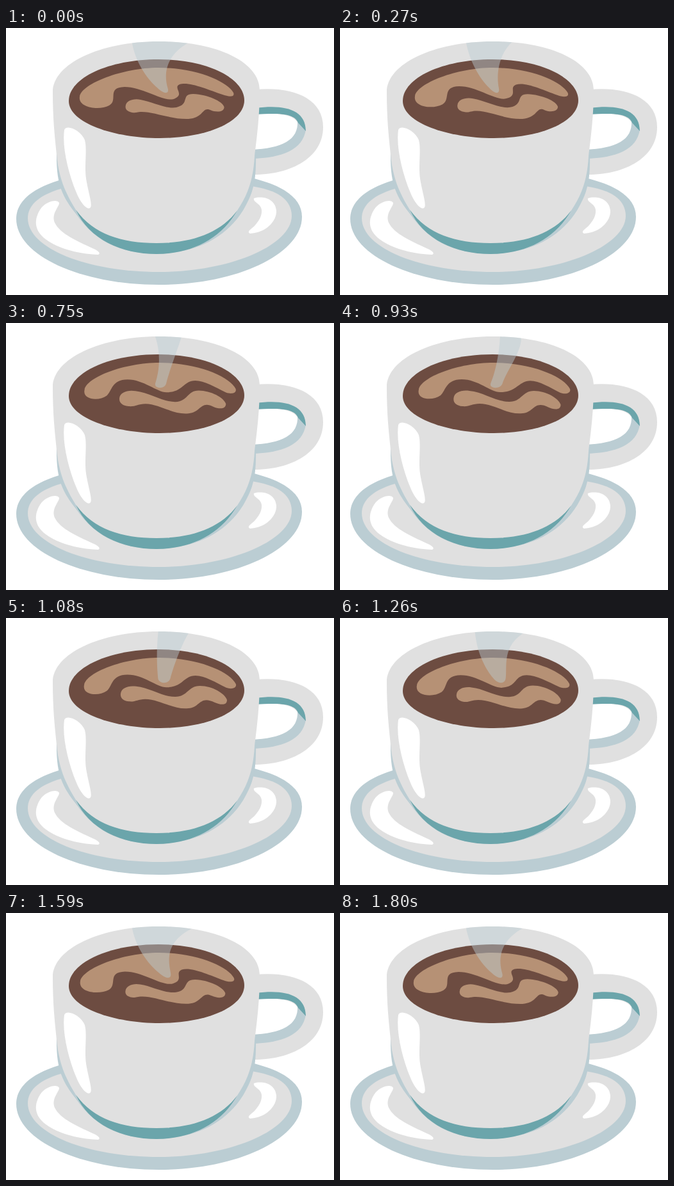
Write an HTML page that moves like this. It is 512 px wide and 417 px high and loops after 1830 ms.

```html
<!DOCTYPE html>
<html lang="en">
<head>
<meta charset="utf-8">
<title>Coffee cup</title>
<style>
  html, body { margin: 0; width: 100%; height: 100%; overflow: hidden; background: #fff; }
  svg { display: block; width: 100%; height: 100%; }
  .light { fill: #e0e0e0; }
  .blue { fill: #bbcdd3; }
  .teal { fill: #6ba5ab; }
  .white { fill: #fff; }
  .coffee { fill: #6d4c41; }
  .crema { fill: #b69175; }
</style>
</head>
<body>
<svg viewBox="0 0 512 417">
  <defs>
    <path id="cup" d="M73 100C73 56 147 21 238 21S396 53 396 97C396 140 391 175 388 200C386 240 376 262 361 285C336 329 290 353 235 353S130 330 109 284C94 260 82 235 79 197C76 170 73 140 73 100Z"/>
    <clipPath id="inCup"><use href="#cup"/></clipPath>
  </defs>

  <!-- saucer -->
  <path class="blue" d="M16 298C16 355 116 401 239 401S462 352 462 295C462 260 420 238 350 228H130C60 238 16 262 16 298Z"/>
  <path class="light" d="M34 297C34 344 126 381 239 381C348 381 445 340 446 294C446 268 424 253 383 247L86 251C55 260 34 275 34 297Z"/>
  <path class="white" d="M83 273C80 267 62 270 53 284C42 302 46 318 62 330C82 345 115 353 144 354C149 352 143 347 135 344C110 332 85 322 76 304C70 290 84 278 83 273Z"/>
  <path class="white" d="M387 266C400 262 420 266 422 285C423 302 405 320 381 321C375 318 383 314 388 309C395 301 400 293 399 284C398 274 385 272 387 266Z"/>

  <!-- handle -->
  <path class="light" d="M390 96C445 91 495 108 495 155C495 202 445 230 383 229Z"/>
  <path class="white" d="M390 135C440 130 457 141 457 155C457 175 430 190 385 190Z"/>
  <path class="blue" d="M455 145L468 159C463 190 432 203 383 204V190C431 188 457 175 455 145Z"/>
  <path class="teal" d="M390 125C436 119 468 128 468 161L456 148C450 133 425 133 390 135Z"/>

  <!-- cup -->
  <path class="blue" d="M79 190C78 240 85 260 109 290C140 335 180 352 235 352C300 352 345 325 370 285C387 255 391 240 390 190Z"/>
  <use class="light" href="#cup"/>
  <path class="teal" d="M109 284C130 330 180 353 235 353S336 329 361 285C335 320 290 336 235 336S137 322 109 284Z"/>
  <path class="white" d="M91 159C95 150 117 160 123 175C127 190 122 215 125 235C128 255 135 275 132 280C128 286 118 275 112 262C99 233 87 188 91 159Z"/>

  <!-- drink -->
  <path class="coffee" d="M98 114C98 78 160 49 238 49S372 79 372 113S312 172 240 172S98 148 98 114Z"/>
  <path class="crema" id="upper"/>
  <path class="crema" id="lower"/>
  <path class="blue" id="steam" opacity=".45" clip-path="url(#inCup)"/>
</svg>
<script>
const LOOP = 1830, STEP = 30;
const get = id => document.getElementById(id);

// Smooth swell over one loop: 0 at the ends, 1 halfway; higher powers are briefer.
const swell = (t, power = 1) => ((1 - Math.cos(2 * Math.PI * t / LOOP)) / 2) ** power;
const sway = (t, peak) => Math.cos(2 * Math.PI * (t - peak) / LOOP);

// Two extreme poses of each swirl; lag delays the parts further right.
const swirls = {
  upper: {
    lag: 0.3,
    from: "M115 107C118 87 182 62 238 62C298 62 346 84 355 101C358 109 346 107 338 104C315 96 285 83 271 88C260 93 279 103 264 110C248 118 215 92 185 92C156 93 176 113 161 121C146 129 112 125 115 107Z",
    to: "M123 104C126 85 184 62 240 62C300 62 350 84 359 103C361 110 352 112 344 109C326 100 306 87 291 91C277 95 273 108 251 108C236 109 216 88 190 88C165 88 165 106 157 113C145 122 119 120 123 104Z"
  },
  lower: {
    lag: 2,
    from: "M187 122C188 113 200 110 210 112C228 115 250 127 266 124C288 119 272 103 292 103C314 104 338 114 340 123C340 132 325 131 319 128C306 122 310 140 285 142C258 143 232 131 212 131C203 131 203 133 197 132C191 131 186 128 187 122Z",
    to: "M177 117C178 108 190 104 202 106C224 108 243 123 264 123C284 123 284 106 303 106C322 106 342 118 345 128C345 138 333 135 326 132C302 120 303 140 285 141C262 144 240 126 218 126C206 126 202 131 191 130C181 129 176 124 177 117Z"
  }
};

function swirlPath({ from, to, lag }, t) {
  const ends = to.match(/\d+/g);
  let i = 0, weight;
  return from.replace(/\d+/g, start => {
    if (i % 2 === 0) weight = swell(t - (start - 240) * lag);
    return +start + (ends[i++] - start) * weight;
  });
}

function steamPath(t) {
  const topL = 196 + 54 * swell(t - 20, 4);
  const highL = 200 + 50 * swell(t + 40, 3);
  const tipL = 236 + 4 * sway(t, 1440);
  const lowL = (highL + tipL) / 2;
  const tipR = 253 + 6 * sway(t, 1350);
  const lowR = 253 + 9 * sway(t, 1150);
  const highR = 246 + 40 * swell(t - 20, 6);
  const topR = 302 - 36 * swell(t + 495, 2) - 14 * swell(t - 100, 2);
  return `M${topL} 18C${highL} 50 ${lowL} 78 ${tipL} 94
    C${tipL + (tipL - lowL) / 2} 103 ${tipR + (tipR - lowR) / 2} 104 ${tipR} 94
    C${lowR} 75 ${highR} 42 ${topR} 20Z`;
}

function draw(time) {
  const t = Math.floor(time % LOOP / STEP) * STEP;
  for (const id in swirls) get(id).setAttribute("d", swirlPath(swirls[id], t));
  get("steam").setAttribute("d", steamPath(t));
}

const start = performance.now();
function tick() {
  draw(performance.now() - start);
  requestAnimationFrame(tick);
}
tick();
</script>
</body>
</html>
```
